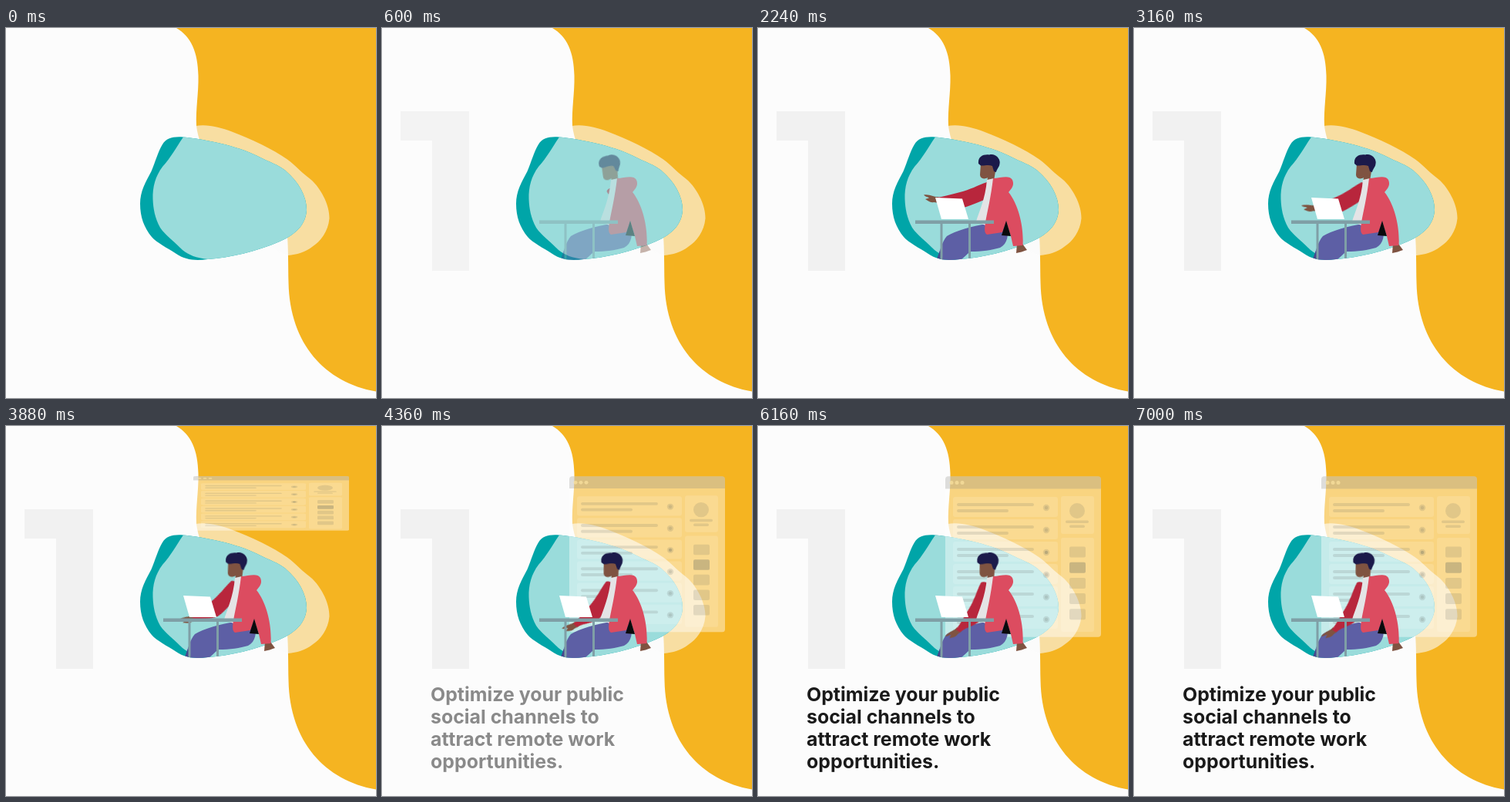
Write an HTML page that moves like this. It is 480 px wide and 480 px high and loops after 7040 ms.

```html
<!DOCTYPE html>
<html lang="en">
<head>
<meta charset="utf-8">
<title>Remote work tip</title>
<style>
  html, body { margin: 0; width: 100%; height: 100%; overflow: hidden; background: #fcfcfc; }
  svg { display: block; width: 100vw; height: 100vh; }
  .move { animation: 7040ms cubic-bezier(.33, 0, .67, 1) infinite both; }

  .digit { animation-name: digit; }
  .scene { animation-name: scene; }
  .arm { animation-name: arm; transform-origin: 297px 211px; }
  .head { animation-name: head; transform-origin: 302px 197px; }
  .laptop { animation-name: laptop; transform-origin: 255px 248px; }
  .window { animation-name: window; transform-origin: 344px 65px; }
  .copy { animation-name: copy; font: 700 24.9px Montserrat, Inter, sans-serif; fill: #1a1a1a; }

  @keyframes digit { 0%, 3% { opacity: 0; } 11%, 100% { opacity: 1; } }
  @keyframes scene { 0%, 5% { opacity: 0; } 12.8%, 100% { opacity: 1; } }
  @keyframes arm {
    0%, 17% { transform: rotate(-100deg) scale(.5); }
    31.8%, 32.1% { transform: none; }
    74.7%, 100% { transform: rotate(-45deg); }
  }
  @keyframes head {
    0%, 17% { transform: rotate(-12deg); }
    31.8%, 45% { transform: none; }
    65%, 100% { transform: rotate(-4deg); }
  }
  @keyframes laptop { 0%, 22.7% { transform: scaleY(0); } 29.8%, 100% { transform: none; } }
  @keyframes window { 0%, 49.86% { transform: scaleY(0); } 63.35%, 100% { transform: none; } }
  @keyframes copy { 0%, 58.24% { opacity: 0; } 65.63%, 100% { opacity: 1; } }

  .card { fill: #fff; fill-opacity: .13; }
  .ink { fill: #5f665c; fill-opacity: .16; }
  .dark { fill-opacity: .32; }
</style>
</head>
<body>
<svg viewBox="0 0 480 480">
  <defs>
    <path id="blob" d="M230 141.5C216 140.5 208 143 203 151C197 161 194 173 188.5 186C181 200 174 212 174 228C174 245 179 259 189 271C196 279 209 285 221 293C233 301 245 302 262 300C290 298 325 290 355 277C376 268 389 255 390 236C390 218 380 200 362 184.5C354 178 342 174 325 165.5C300 153 257 144 230 141.5Z"/>
    <clipPath id="inside"><use href="#blob"/></clipPath>
  </defs>

  <path fill="#f5b421" d="M221 0C240 11 249 31 249.5 62C250 85 246 104 247 127C249 143 255 160 270 180C310 215 350 235 364 262C366 275 366 290 366.5 330C368 410 414 460 480 471.5V0Z"/>
  <path fill="#fcfcfc" fill-opacity=".59" d="M246 127C262 124.5 278 129 293 134.5C318 144 346 157 365 170.5C375 178 383 187 391 193C408 205 420 230 419.5 247C418 264 408 277 397 284C388 291 377 294 366 295C340 290 260 220 246 127Z"/>

  <use href="#blob" fill="#00a5a8"/>
  <path fill="#9adcdb" d="M230 141.5C257 144 300 153 325 165.5C342 174 354 178 362 184.5C380 200 390 218 390 236C389 255 376 268 355 277C325 290 290 298 262 300C246 298 238 295 229 288C218 277 206 268 200 259C193 246 191 234 190.5 222C190 206 194 192 203 180C214 168 220 156 230 141.5Z"/>

  <path class="move digit" fill="#f1f1f1" d="M24 108H113V315H65V146H24Z"/>

  <g class="move window">
    <rect x="243" y="65.3" width="202" height="208.5" rx="4" fill="#fff" fill-opacity=".43"/>
    <path fill="#8a8a80" fill-opacity=".28" d="M247 65.3H441Q445 65.3 445 69.3V81.5H243V69.3Q243 65.3 247 65.3Z"/>
    <g fill="#fbe3a0" fill-opacity=".7">
      <circle cx="251" cy="73.6" r="2.5"/><circle cx="258" cy="73.6" r="2.5"/><circle cx="265" cy="73.6" r="2.5"/>
    </g>
    <rect class="card" x="393" y="91" width="43" height="49" rx="3"/>
    <rect class="card" x="393" y="145" width="43" height="122" rx="3"/>
    <circle class="ink" cx="414" cy="110" r="10"/>
    <rect class="ink" x="399" y="122.5" width="30" height="3.5" rx="1.7"/>
    <rect class="ink" x="404" y="128.5" width="20" height="3.5" rx="1.7"/>
    <g id="list"></g>
  </g>

  <g class="move scene">
    <g clip-path="url(#inside)">
      <path fill="#5d5fa5" d="M322 252L297 254C278 257 256 263 245 270C239 277 236 288 232 302H262C267 298 271 293 276 290C290 290 304 288 314 285C324 280 326 268 322 252Z"/>
      <path fill="#45478c" d="M236 289L231 302H241C239 298 239 293 236 289Z"/>
    </g>
    <g class="move arm">
      <path fill="#7f5341" d="M234 219C229 220 223 215 215 216.5C217 219 220 219 222 220.5L217 222C221 224 223 227 228 226L235 227Z"/>
      <path fill="#b8263c" d="M297 200C285 204 275 210 262 213C250 216 240 219 231 220L232 226C245 228 250 234 262 234C275 232 288 224 297 222C306 218 305 202 297 200Z"/>
    </g>
    <g class="move head">
      <path fill="#7f5341" d="M289 176L288 190C288 195 293 197 298 194L297 200L306 198L309 180L302 175Z"/>
      <path fill="#1b1a4a" d="M286 176C285 167 292 163.5 300 164.5C308 162 315 170 313.5 176C313 181 310 182 309 187L306 186L304 179C299 177 293 179 289 178.5Z"/>
    </g>
    <path fill="#e4e4e6" d="M297 197L306 195C305 218 299 236 295 256L283 251C286 240 295 222 297 197Z"/>
    <path fill="#7f5341" d="M336 280L343 280L349 288L346 289L342 290.5L335 292Z"/>
    <path fill="#dc4c60" d="M305 195C314 195 326 190 330 197C333 204 329 208 325 213C338 229 345 258 343.5 282L331 283L328 270L322 251L317 265L297 268C293 266 294 260 295 252C298 236 302 220 305 195Z"/>
    <path fill="#0a0a0c" d="M322 250L328 270L316 269Z"/>
    <polygon class="move laptop" fill="#fff" points="230,220 265,221.5 273,248 238,248"/>
    <path fill="#7f9fa6" d="M204 249.5H306V254H204Z"/>
    <path fill="#7f9fa6" clip-path="url(#inside)" d="M236.5 254H239.5V302H236.5ZM273 254H276V302H273Z"/>
  </g>

  <text class="move copy">
    <tspan x="63" y="357">Optimize your public</tspan>
    <tspan x="63" y="386">social channels to</tspan>
    <tspan x="63" y="415">attract remote work</tspan>
    <tspan x="63" y="444">opportunities.</tspan>
  </text>
</svg>
<script>
  const list = document.getElementById('list');

  function add(tag, className, attrs) {
    const node = document.createElementNS('http://www.w3.org/2000/svg', tag);
    node.setAttribute('class', className);
    for (const key in attrs) node.setAttribute(key, attrs[key]);
    list.append(node);
  }

  const bar = (x, y, width, height, rx, className = 'ink') =>
    add('rect', className, { x, y, width, height, rx });

  for (let i = 0; i < 6; i++) {
    const y = 106 + i * 29;
    bar(253, y - 14, 136, 26, 3, 'card');
    bar(258, y - 6, 100, 4, 2);
    bar(258, y + 2, 67, 4, 2);
    add('circle', 'ink', { cx: 374, cy: y, r: 4.2 });
    add('circle', i === 2 ? 'ink dark' : 'ink', { cx: 374, cy: y, r: 2.2 });
  }
  for (let i = 0; i < 5; i++) {
    bar(404, 156.5 + i * 20.2, 21, 14, 2, i === 1 ? 'ink dark' : 'ink');
  }
</script>
</body>
</html>
```
